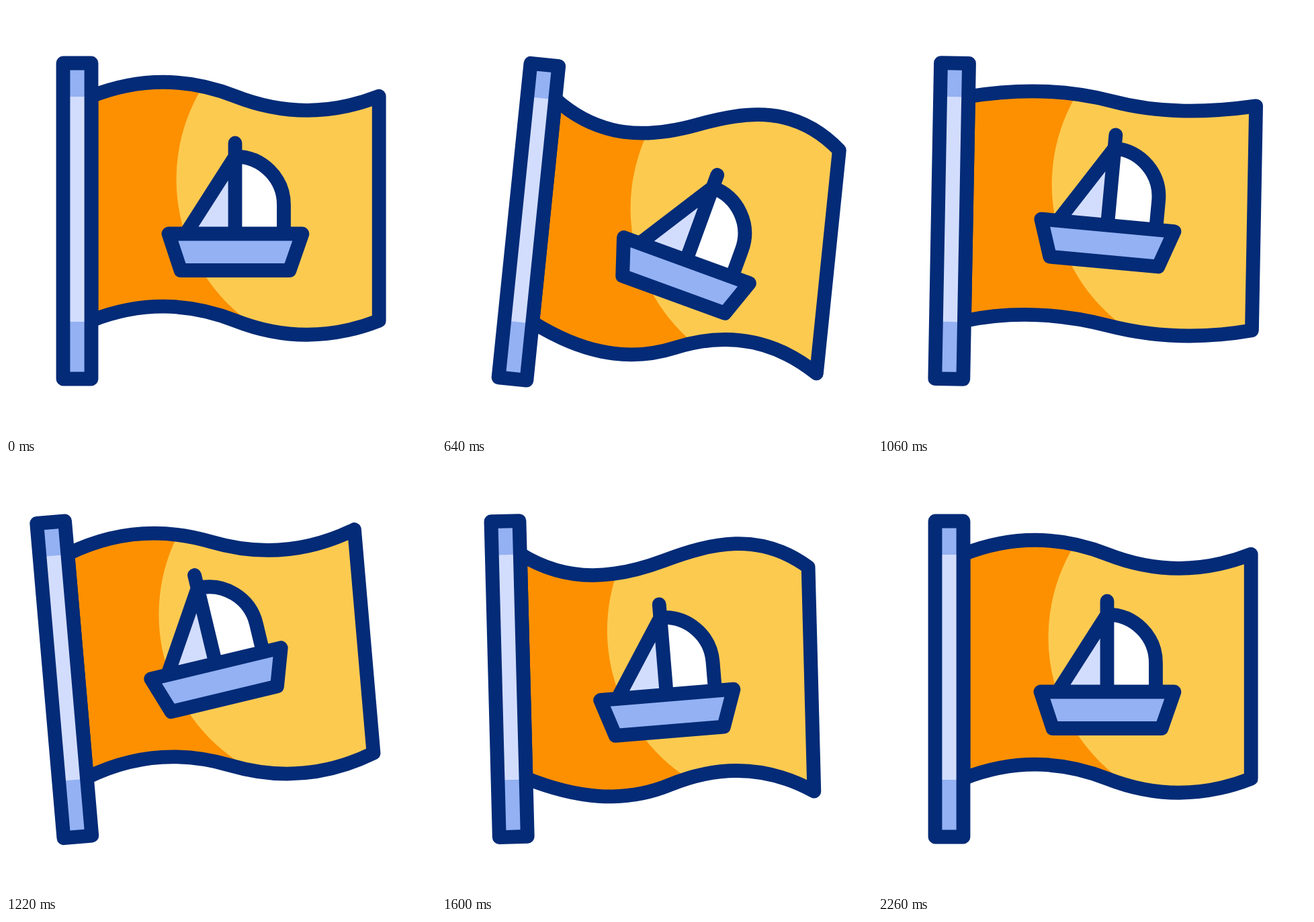
Write an HTML page that moves like this. It is 640 px wide and 640 px high and loops after 2.4 s.

```html
<!DOCTYPE html>
<html lang="en">
<head>
<meta charset="utf-8">
<title>Waving flag</title>
<style>
  html, body { margin: 0; width: 100%; height: 100%; overflow: hidden; background: #fff; }
  svg { display: block; width: 100%; height: 100%; }
  .line { fill: none; stroke: #032b77; stroke-width: 20.8; stroke-linecap: round; stroke-linejoin: round; }
  .orange { fill: #fd9000; }
  .yellow { fill: #fdca50; }
  .pale { fill: #d2ddfe; }
  .blue { fill: #93b1f3; }
  .white { fill: #fff; }
</style>
</head>
<body>
<svg viewBox="0 0 640 640">
  <defs>
    <path id="cloth"/>
    <clipPath id="clothClip"><use href="#cloth"/></clipPath>
  </defs>
  <g id="scene">
    <use href="#cloth" class="orange"/>
    <circle class="yellow" cx="515.5" cy="258" r="262" clip-path="url(#clothClip)"/>
    <use href="#cloth" class="line"/>

    <g id="boat">
      <path class="pale" d="M341 224 267.5 339H341Z"/>
      <path class="white" d="M341 224C381 224 413.5 256 413.5 296V339H341Z"/>
      <path class="blue" d="M242 339H441L422 393.5H260Z"/>
      <path class="line" d="M341 204V338M341 224 267.5 339M341 224C381 224 413.5 256 413.5 296V339M242 339H441L422 393.5H260Z"/>
    </g>

    <rect class="blue" x="85" y="85" width="42" height="470"/>
    <rect class="pale" x="85" y="135" width="42" height="335"/>
    <rect class="line" x="85" y="85" width="42" height="470"/>
  </g>
</svg>
<script>
const LOOP = 2400, STEP = 20;

// Each track is a list of [time, value], eased in and out between entries.
const tracks = {
  sway:  [[200, 0], [800, 7], [1400, -8], [1800, 5], [2200, 0]],
  roll:  [[200, 0], [800, 17], [1400, -15.2], [1800, 8.8], [2200, 0]],
  wave:  [[200, 0], [700, 1], [1200, 0], [1700, 1], [2200, 0]],
  heave: [[200, 0], [700, 14], [1200, -24], [1700, 14], [2200, 0]],
  drift: [[700, 0], [1200, -6], [1700, 0]]
};

const $ = id => document.getElementById(id);
const mix = (a, b, k) => a + (b - a) * k;

function valueAt(track, t) {
  if (t <= track[0][0]) return track[0][1];
  for (let i = 1; i < track.length; i++) {
    const [t0, a] = track[i - 1], [t1, b] = track[i];
    if (t < t1) return mix(a, b, (1 - Math.cos(Math.PI * (t - t0) / (t1 - t0))) / 2);
  }
  return track[track.length - 1][1];
}

// Cloth edge: two cubics, handles bent between the resting and the inverted wave.
const LEFT = 127, MID = 341, RIGHT = 555.2, HANDLE = 71.3;

function edge(y, start, joint, end, k) {
  const mid = y + 17 * k, tip = y + 34 * k;
  const a = mix(-28, start, k), b = mix(-28, joint, k), c = mix(28, end, k);
  return [
    [LEFT, y], [LEFT + HANDLE, y + a], [MID - HANDLE, mid + b],
    [MID, mid], [MID + HANDLE, mid - b], [RIGHT - HANDLE, tip + c],
    [RIGHT, tip]
  ];
}

function clothPath(k) {
  const top = edge(134.3, 55, 30, -64, k);
  const bottom = edge(468.2, 37, 33, -49, k).reverse();
  const curve = pts => "C" + pts.slice(1).join(" ");
  return `M${top[0]}${curve(top)}L${bottom[0]}${curve(bottom)}Z`;
}

function draw(t) {
  const at = name => valueAt(tracks[name], t);
  $("cloth").setAttribute("d", clothPath(at("wave")));
  $("scene").setAttribute("transform", `rotate(${at("sway")} 106 545)`);
  $("boat").setAttribute("transform",
    `translate(${at("drift")} ${at("heave")}) rotate(${at("roll")} 341 356)`);
}

const begin = performance.now();
function tick() {
  const t = (performance.now() - begin) % LOOP;
  draw(Math.floor(t / STEP) * STEP);
  requestAnimationFrame(tick);
}
tick();
</script>
</body>
</html>
```
